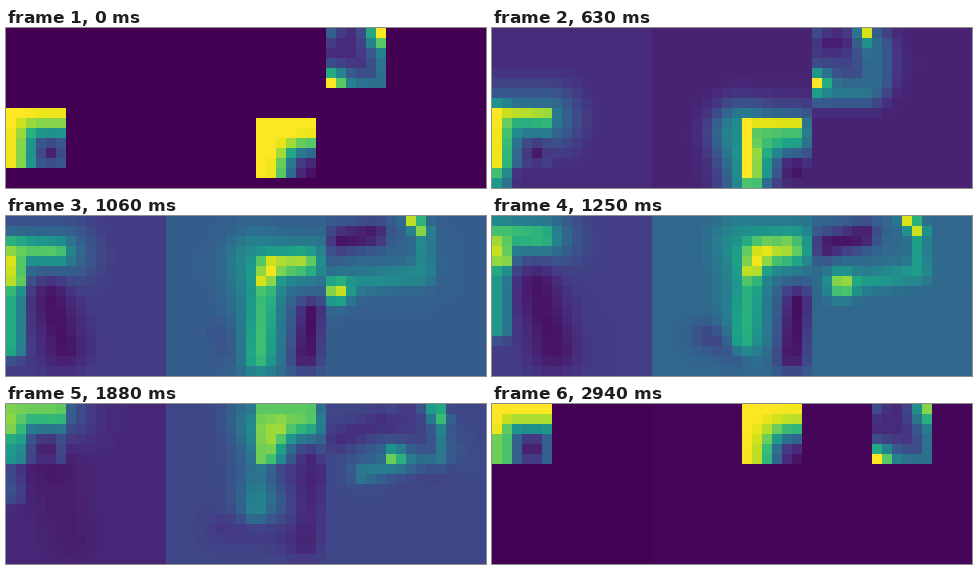
Write a matplotlib script that moves like this. It is 480 px wide and 160 px high and loops after 3.12 s.

```python
import math

import numpy as np
import matplotlib.pyplot as plt
from matplotlib.animation import FuncAnimation

N = 16                # cells per side of a panel
TICK = 10             # ms
TICKS = 312
STEP = 6.25           # ticks per simulation step

Y, X = np.mgrid[0:N, 0:N].astype(float)
PY, PX = np.mgrid[0:6, 0:6].astype(float)


def rise(k, a, b):
    return min(max((k - a) / (b - a), 0), 1)


def bowl(cx, cy, power, mid, slope):
    """6x6 patch, dark at one point and brighter away from it."""
    d = (abs(PX - cx) ** power + abs(PY - cy) ** power) ** (1 / power)
    return .03 + 1.03 / (1 + np.exp(-slope * (d - mid)))


def tips(low_left, top_right, corner):
    """6x6 patch with two bright corners joined by a faint edge."""
    v = .1 + .27 * (np.maximum(PX, PY) / 5) ** 3
    v += low_left * np.exp(-(PX ** 2 + (PY - 5) ** 2) / 1.8)
    v += top_right * np.exp(-((PX - 5) ** 2 + PY ** 2) / 1.8)
    return v + corner * np.exp(-(PX ** 2 + PY ** 2))


class Field:
    """One panel at step k, painted with soft strokes."""

    def __init__(self, k, peak, spread):
        self.k = k
        self.melt = rise(k, 3, 10) * (1 - rise(k, 25, 36))
        width = spread if k < 20 else 15
        level = peak * math.exp(-((k - 20) / width) ** 2) * rise(k, 3, 10)
        self.v = np.full((N, N), level)

    def stroke(self, start, end, value, soft, strength=None):
        (x0, y0), (x1, y1) = start, end
        dx, dy = x1 - x0, y1 - y0
        along = ((X - x0) * dx + (Y - y0) * dy) / max(dx * dx + dy * dy, 1e-9)
        along = np.clip(along, 0, 1)
        d2 = (X - x0 - along * dx) ** 2 + (Y - y0 - along * dy) ** 2
        strength = self.melt if strength is None else strength
        self.v += strength * np.exp(-d2 / soft ** 2) * (value - self.v)

    def stamp(self, patch, x, y, weight):
        area = self.v[y:y + 6, x:x + 6]
        area += weight * (patch - area)

    def finish(self, first, last):
        """Shade below the final patch, then fade both sharp patches."""
        k, x = self.k, last[1]
        shade = .6 * rise(k, 25, 34) * (1 - rise(k, 37, 41))
        self.stroke((x + 1, 6), (x + 5, 6), .04, 2.2, shade)
        self.stamp(*first, 1 - .55 * rise(k, 3, 10) - .45 * rise(k, 10, 14))
        self.stamp(*last, rise(k, 25, 36) ** .8)
        return self.v


def left(k, e):
    f = Field(k, .18, 16)
    y = 8 * (1 - e)
    f.stroke((0, y + .5), (5, y + .5), .42, 3)                      # halo
    f.stroke((4, y + 4 + 1.5 * e), (4 + 2 * e, 12 + e), .05, 1.3 + 1.4 * e)
    f.stroke((.3, y), (.3, 14.5 - 6 * e ** 3), .75 - .3 * e ** 3, .9)
    f.stroke((0, y), (5 - .5 * e, y + .3), .85 - .17 * e, .6 + .6 * e)
    f.stroke((.3 * e, y + 1.5 * e), (.6 * e, y + 5 - 2.7 * e),
             .97, .6 + .3 * e)                                      # hot spot
    return f.finish(LEFT_START, LEFT_END)


def middle(k, e):
    f = Field(k, .33, 9)
    y = 9 * (1 - e)
    corner = (8.5, y + 1)
    for end in ((14, y + 1), (9, 15 - 6 * e ** 3)):                 # halo
        f.stroke(corner, end, .48, 2.5)
    f.stroke((5, 9 + 3 * e), (5 + 8 * e ** 6, 13), .12, 1.5, f.melt * e ** 3)
    f.stroke((14, y + 4.5 + 2.5 * e), (13.5, 13.5), .04, 1 + .7 * e)
    f.stroke((9.5, y + 3), (9.5 - e, 15 - 5 * e ** 3),
             .78 - .2 * e * e, 1 + .3 * e)                          # limb
    f.stroke((9 + 1.3 * e * e, y + 2.2 * e), (14 - e, y + 1.6 * e),
             .88, .5 + 1.4 * e * e)                                 # bar
    f.stroke((9 + .4 * e, 5 + 9 * (1 - e) ** 2), (9 + 2 * e, y + 1.8 * e),
             .98, .5 + .3 * e)                                      # hot spot
    return f.finish(MIDDLE_START, MIDDLE_END)


def right(k, e):
    f = Field(k, .33, 9)
    x = 6 * e
    edge = 5 + x
    tip = (6.5 * e ** 6, 5 + 2 * math.sin(math.pi * e ** 1.5))
    f.stroke((1 + x / 2, 2 + 3 * e), (edge, 3 + 2 * e), .24 + .14 * e, 2.8)
    f.stroke((1, 1 + 2 * e * e), (3 + 2 * e, 1 + .5 * e), .05, 1 + .4 * e)
    f.stroke((min(tip[0], 3), 6 + .5 * e), (edge, 6 - e),
             .4 + .2 * e * e, 1.3 - .5 * e * e)                     # low band
    f.stroke((edge + 1 - e, 1), (edge + 1 - e, 5),
             .35 + .3 * e * e, 1.3 - .6 * e)                        # side band
    f.stroke(tip, tip, .6, 1.2 + .3 * e)
    f.stroke(tip, (tip[0] + .5 * e, tip[1]), .98 - .13 * e * e, .7 + .2 * e)
    f.stroke((5 + .8 * x, 0), (edge, e), .88 + .08 * e, .6 + .1 * e)
    return f.finish(RIGHT_START, RIGHT_END)


# patch, column, row
LEFT_START = bowl(4, 4, 4, 2.1, 1.3), 0, 8
LEFT_END = bowl(3.5, 4, 6, 2.1, 1.7) * (1 - .2 * (PX == 0) * (PY > 2)), 0, 0
MIDDLE_START = bowl(5, 5, 2.5, 2.5, 1.6), 9, 9
MIDDLE_END = .96 * bowl(5, 5, 2.5, 2.6, 1.4), 9, 0
RIGHT_START = tips(.65, .65, .2), 0, 0
RIGHT_END = tips(.65, .45, .12), 6, 0


def field(tick):
    k = math.ceil((tick + .5) / STEP) - 1
    e = 1 - (1 - rise(k, 10, 25)) ** 1.7
    return np.clip(np.hstack([draw(k, e) for draw in (left, middle, right)]),
                   0, 1)


fig = plt.figure(figsize=(4.8, 1.6), dpi=100)
ax = fig.add_axes((0, 0, 1, 1))
ax.axis("off")
image = ax.imshow(field(0), cmap="viridis", vmin=0, vmax=1,
                  interpolation="nearest", aspect="auto")


def update(tick):
    image.set_data(field(tick))
    return (image,)


anim = FuncAnimation(fig, update, frames=TICKS, interval=TICK,
                     repeat=True, repeat_delay=0)
plt.show()
```
